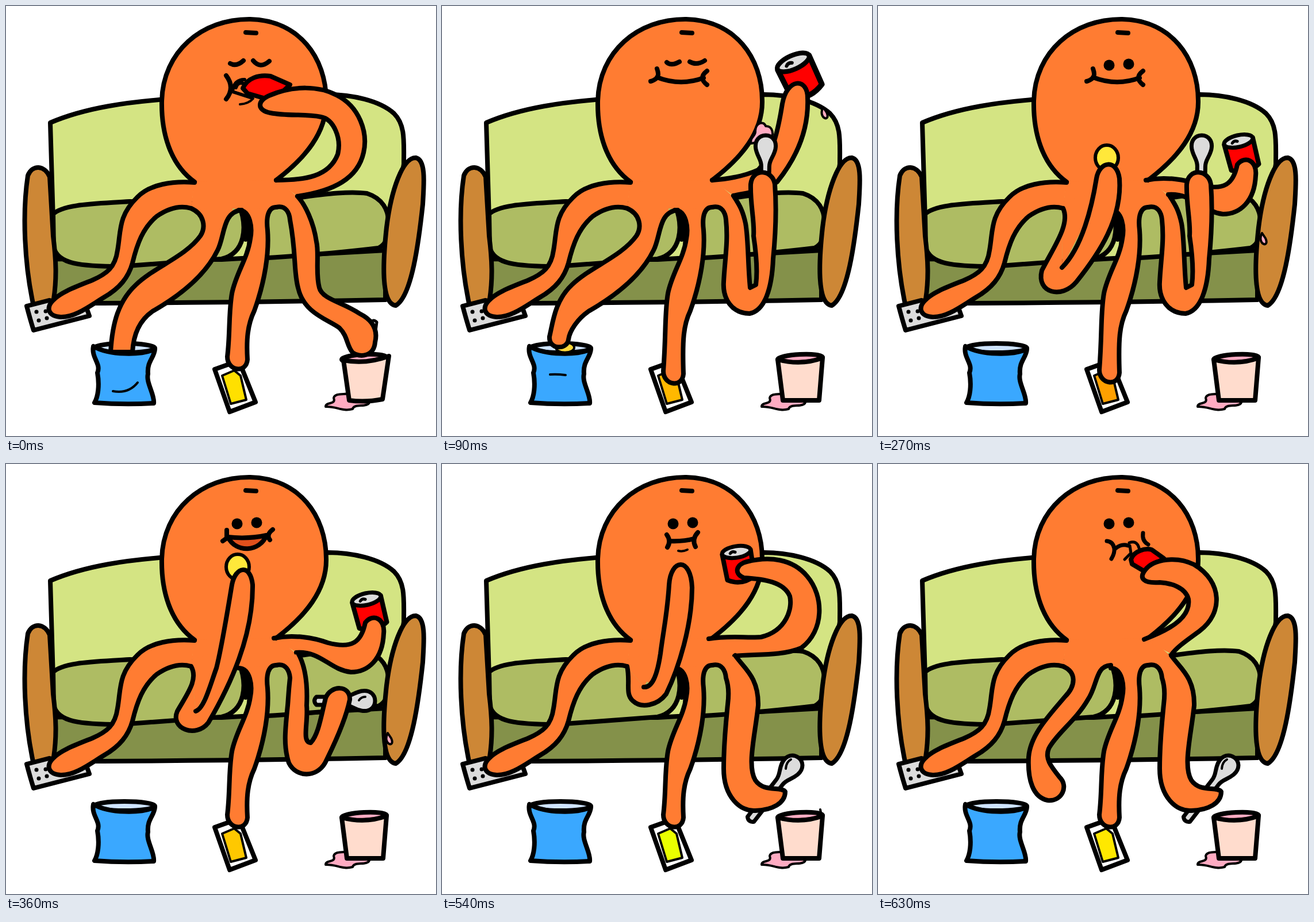
These frames come from a looping animation (748 by 748 pixels, 720 ms). An HTML page:

```html
<!DOCTYPE html>
<html lang="en">
<head>
<meta charset="utf-8">
<title>Octopus on a sofa</title>
<style>
html, body { margin: 0; height: 100%; overflow: hidden; background: #fff; }
svg { display: block; width: 100vw; height: 100vh; }
</style>
</head>
<body>
<svg id="stage" viewBox="0 0 748 748" stroke="#000" stroke-linecap="round" stroke-linejoin="round"></svg>
<script>
const SKIN = '#ff7c32', GREY = '#dcdcdc', PINK = '#ffabc2', RED = '#ff0000', CHIP = '#ffe83a';
const STEP = 90;

const path = (d, fill = 'none', w = 8) => `<path d="${d}" fill="${fill}" stroke-width="${w}"/>`;
const flat = (d, fill) => `<path d="${d}" fill="${fill}" stroke="none"/>`;
const oval = (x, y, rx, ry, fill, w = 7, turn = 0) =>
  `<ellipse cx="${x}" cy="${y}" rx="${rx}" ry="${ry}" fill="${fill}" stroke-width="${w}" transform="rotate(${turn} ${x} ${y})"/>`;
const dot = (x, y, r) => oval(x, y, r, r, '#000', 0);

// Props
const can = (x, y, turn, size = 1) => `<g transform="translate(${x} ${y}) rotate(${turn}) scale(${size})">` +
  path('M-25 1L-23 46Q0 60 25 46L25 0Z', RED) + oval(0, 0, 25, 10, GREY) + path('M-11 1Q-7 -3 -2 0', 'none', 5) + '</g>';

function spoon(x, y, endX, endY) {
  const len = Math.hypot(endX - x, endY - y);
  const turn = Math.atan2(endY - y, endX - x) * 180 / Math.PI;
  return `<g transform="translate(${x} ${y}) rotate(${turn})">` +
    path(`M6 -17C20 -14 24 -7 36 -7L${len} -7Q${len + 7} 0 ${len} 7L36 7C24 7 20 14 6 17C-26 23 -26 -23 6 -17Z`, GREY, 7) + '</g>';
}

const drop = (x, y) => path(`M${x} ${y}C${x - 10} ${y + 20} ${x + 14} ${y + 27} ${x + 6} ${y + 9}Z`, PINK, 4);

// Scenery
const sofa =
  path('M77 203C140 176 215 167 280 162L560 154C600 154 650 164 675 187C695 207 692 235 692 275L665 440L84 440Z', '#d4e483') +
  path('M85 440L375 441L462 436L660 425L660 511Q350 517 82 517Z', '#84914a') +
  path('M82 362C100 344 160 344 215 340L405 345C421 385 416 430 375 440Q290 446 200 453C130 453 90 449 83 420Z', '#aebc63') +
  path('M422 345L505 334C560 326 600 322 628 326C656 335 665 356 665 374C667 400 662 414 648 421Q560 432 424 440Z', '#aebc63') +
  path('M414 365Q421 382 417 405', 'none', 10) +
  path('M38 295C46 275 67 277 76 297L82 400C87 440 89 475 82 516L48 522C32 450 28 360 38 295Z', '#cd8736') +
  path('M713 264C731 268 727 310 725 345C718 410 706 505 678 521C651 518 656 440 662 385C670 320 690 263 713 264Z', '#cd8736') +
  path('M36 522L75 512L140 525L145 539L48 564Q42 545 36 522Z', GREY) +
  dot(53, 532, 3.5) + dot(69, 531, 3.5) + dot(57, 547, 3.5) + dot(71, 543, 3.5);

const puddle = path('M556 697C556 688 575 694 570 682C572 672 590 677 602 673L632 690C628 699 605 691 603 701C585 706 575 696 556 697Z', PINK, 4);

const bagBack = oval(206, 595, 53, 8, '#cfe4ff', 8);
const bagFront = path('M152 592C148 612 166 622 159 638C163 660 160 680 154 690Q205 694 257 691C259 676 243 655 247 640C245 618 258 612 259 597C235 608 180 608 152 592Z', '#3aa8ff');

const cupBack = oval(623, 613, 39, 7, PINK, 8, -3);
const cupFront = path('M584 615L593 686L656 686L662 612Q625 626 584 615Z', '#ffdccd');
const deepCup = path('M587 616L597 686Q625 690 655 684L666 609Q625 624 587 616Z', '#ffdccd');

const phone = color => path('M363 632L405 617L434 689L389 706Z', '#fff') +
  path('M376 643L397 634L408 643L418 685L391 692Z', color, 4);

// Body
const head = path('M328 306C285 275 270 220 271 165C273 80 340 22 425 23C510 25 557 90 557 165C558 220 520 265 470 303', SKIN) +
  path('M417 46L435 47', 'none', 8);
const torso = flat('M328 300L470 300L508 333L492 353L470 350L440 370L413 355L395 352L365 385L322 351Z', SKIN);
const restArm = path('M328 307C290 304 250 310 228 333C195 365 200 392 194 425C190 455 175 466 150 477C120 489 95 498 82 512C68 526 75 540 95 541C120 542 145 522 170 507C198 491 213 472 220 447C228 414 238 386 262 366C285 350 305 347 322 352', SKIN);
const tapArm = y => path(`M405 355C425 356 429 385 425 405C420 440 400 465 393 500C387 535 390 570 385 ${y - 22}C385 ${y + 3} 418 ${y + 8} 420 ${y - 17}C418 580 420 555 432 530C450 480 458 430 455 390C452 365 457 350 470 350`, SKIN);

// Snack arm
const ROOT = 'M322 352';
const reachBag = ROOT + 'C345 362 348 385 338 400C312 436 258 454 226 485C196 513 ';
const backFromBag = 'C222 565 236 544 255 531C297 507 345 472 368 425C381 400 376 358 410 355';
const snack = {
  inBag: reachBag + '185 550 182 602L220 602' + backFromBag,
  aboveBag: reachBag + '193 550 187 575C185 598 218 599 220 580' + backFromBag,
  grab: ROOT + 'C345 362 348 380 340 392C320 430 270 445 245 490C230 515 230 545 247 570C260 577 280 572 279 552C272 525 272 505 295 485C325 460 365 435 372 410C380 385 380 356 410 355',
  lift: ROOT + 'C335 380 305 420 285 460C275 500 320 510 345 480C385 430 425 370 420 300C415 265 385 270 380 300C372 350 355 420 320 455',
  eat: ROOT + 'C335 375 315 400 298 430C285 460 330 478 352 450C390 385 430 300 429 210C425 173 399 178 393 210C383 270 375 320 366 355C355 385 345 425 330 430',
  lick: ROOT + 'C328 380 318 400 332 412C347 426 375 420 390 400C412 355 435 280 435 215C433 161 398 164 395 210C392 260 385 290 380 330C374 370 365 389 351 388',
  down: ROOT + 'C345 362 345 385 325 405C300 435 265 470 262 510C260 550 270 580 295 585C320 588 332 560 316 545C300 525 290 512 297 495C310 470 345 445 365 410C382 385 378 351 405 350'
};
const snackRoot = end => flat(`M322 340L322 352L${end}L390 320Z`, SKIN);

// Spoon arm
const HIP = 'M470 350C487 346 493 360 494 372';
const scoop = {
  inCup: HIP + 'C505 430 500 460 508 490C518 535 560 545 580 560C595 575 592 590 603 603C615 612 640 610 642 585C648 560 635 545 615 535C585 515 550 510 545 490C538 465 545 430 540 410C535 375 520 345 507 331',
  raise: HIP + 'C498 410 492 440 490 480C488 510 505 535 535 535C562 530 574 490 576 440C580 400 582 350 579 310C575 284 540 281 537 310C536 345 544 375 542 400C548 440 548 470 546 485L536 490C532 450 533 405 528 378C522 350 514 342 507 330',
  mouth: 'M470 350C476 350 478 357 480 362C490 385 500 410 520 417C555 434 580 400 583 360C587 310 575 250 545 222C520 195 490 184 455 188C430 192 417 207 424 224C440 230 470 220 490 232C530 255 552 300 550 345C549 370 530 366 525 355C515 342 503 332 503 325',
  side: HIP + 'C491 400 491 410 490 420C486 460 482 490 492 520C505 546 540 546 555 520C575 480 592 440 598 410C599 384 565 384 556 407C548 440 543 472 530 485C514 484 526 450 523 420C525 380 520 350 508 329',
  lower: HIP + 'C492 400 493 410 492 420C486 470 482 510 495 545C515 575 555 570 575 545C595 525 605 505 600 490C590 474 570 480 562 500C550 525 535 530 530 505C528 470 540 440 535 405C532 370 520 345 508 330',
  floor: HIP + 'C500 390 498 400 498 408C495 440 490 480 490 530C490 580 520 605 545 603C575 602 597 590 597 570C590 560 560 572 545 550C530 525 545 470 550 420C551 370 525 355 510 333'
};

// Can arm
const drink = {
  sip: 'M470 303C520 303 562 297 577 258C584 230 570 197 548 193C520 187 490 192 460 186C435 181 437 164 460 155C500 138 545 139 575 155C615 175 630 220 622 255C612 300 570 322 507 331',
  high: 'M470 303C510 300 535 292 550 285C575 260 585 215 592 170C600 125 636 124 636 160C638 210 620 260 583 306C560 322 530 325 507 330',
  rest: 'M466 303C500 296 535 302 560 311C602 322 618 310 625 276C638 259 660 269 657 295C655 340 630 362 600 362C563 358 548 325 505 328',
  swing: 'M466 303C500 298 540 312 565 305C595 290 590 265 583 245C575 215 605 205 620 225C650 270 645 320 605 345C575 350 540 340 507 329',
  near: 'M464 304C500 298 530 303 555 301C600 290 610 250 605 230C595 205 560 200 525 198C506 190 513 174 530 170C570 160 610 165 635 195C665 230 665 290 625 320C590 335 540 330 509 334',
  gulp: 'M463 305C500 291 545 270 540 235C535 215 510 207 490 206C460 208 454 198 465 184C480 165 520 160 550 175C600 205 600 260 560 290C540 305 520 318 511 331'
};
const tipped = path('M412 143C420 125 440 119 460 122L494 137L465 165L420 152Z', RED);
const tippedLow = path('M440 166C445 151 465 146 476 149L497 164L464 187L442 174Z', RED);

// Faces
const eyes = (x, y) => dot(x, y, 9.5) + dot(x + 34, y - 2, 9.5);
const smile = path('M374 124Q415 140 455 125M374 109Q378 120 374 125Q368 130 363 131M461 113C449 122 452 130 461 137', 'none', 8);
const grin = path('M386 127Q420 131 453 124C442 153 400 156 386 127Z', '#e0501c', 8) +
  path('M384 115L384 129L377 134M464 114Q452 123 459 132', 'none', 8);
const chew = path('M391 123Q399 134 392 145M397 134Q420 135 438 130M445 119Q434 131 441 144', 'none', 8) +
  path('M411 151Q419 153 427 149', 'none', 4);
const sipping = path('M390 100Q401 106 413 95M430 95Q442 110 458 96M383 121Q399 142 383 162', 'none', 8) +
  path('M394 148Q397 128 415 128M400 142Q403 131 414 135M394 149L428 160', 'none', 6) + path('M407 171Q422 170 430 161', 'none', 4);
const content = path('M391 98Q399 105 413 97M431 97Q443 104 457 95', 'none', 8) + smile;
const gulping = eyes(402, 104) +
  path('M398 134Q409 135 411 147Q412 155 406 165M413 147Q424 138 435 142M461 120Q459 134 470 140', 'none', 7) +
  path('M437 137Q450 132 454 146M429 166L440 155L438 142', 'none', 5);

const cream = (x, y) => path(`M${x - 18} ${y + 22}C${x - 22} ${y + 12} ${x - 9} ${y + 9} ${x - 11} ${y}C${x - 10} ${y - 14} ${x + 4} ${y - 18} ${x + 7} ${y - 8}C${x + 20} ${y - 9} ${x + 22} ${y + 8} ${x + 15} ${y + 16}Z`, PINK, 4);

const restingCan = can(627, 235, -13, 1.02);
const floorSpoon = spoon(609, 525, 537, 618) + path('M598 530Q599 518 607 514', 'none', 4);

const poses = [
  { face: sipping, can: tipped, drink: 'sip', scoop: 'inCup', snack: 'inBag', tap: 632, screen: '#ffe000',
    spoon: path('M632 556Q637 542 645 550L643 565', '#fff', 5), cup: deepCup, bag: path('M186 670Q213 675 229 655', 'none', 4) },
  { face: content, can: can(611, 98, -24, 1.2), drink: 'high', scoop: 'raise', snack: 'aboveBag', tap: 657, screen: '#ffb800',
    spoon: cream(556, 217) + spoon(563, 243, 562, 300), chip: oval(214, 594, 16, 9, '#ffd83a', 4),
    drip: drop(663, 176), bag: path('M188 641Q200 640 215 642', 'none', 4) },
  { face: eyes(406, 102) + smile, can: restingCan, drink: 'rest', scoop: 'mouth', snack: 'grab', tap: 668, screen: '#ff8000',
    spoon: cream(411, 157) + spoon(419, 177, 470, 243), chip: oval(278, 577, 29, 18, CHIP, 6, 8), drip: drop(674, 312) },
  { face: eyes(402, 103) + smile, can: restingCan, drink: 'rest', scoop: 'raise', snack: 'lift', tap: 655, screen: '#ffa000',
    spoon: spoon(563, 243, 562, 300), chip: oval(398, 264, 20, 22, CHIP, 6), root: '320 455', drip: drop(668, 395) },
  { face: eyes(402, 104) + grin, can: restingCan, drink: 'rest', scoop: 'side', snack: 'eat', tap: 632, screen: '#ffc800',
    spoon: spoon(624, 412, 540, 412) + path('M614 411Q618 405 625 405', 'none', 4),
    chip: oval(403, 179, 20, 22, CHIP, 6), root: '330 430', drip: drop(664, 468) },
  { face: eyes(402, 104) + chew, can: can(583, 197, -12), drink: 'swing', scoop: 'lower', snack: 'eat', tap: 632, screen: '#ffe000',
    spoon: spoon(627, 468, 548, 520), root: '330 430', drip: drop(660, 548) },
  { face: eyes(402, 104) + chew, can: can(512, 153, -9), drink: 'near', scoop: 'floor', snack: 'lick', tap: 632, screen: '#eaff00',
    spoon: floorSpoon, root: '351 388', drip: path('M658 601L659 606', 'none', 4) },
  { face: gulping, can: tippedLow, drink: 'gulp', scoop: 'floor', snack: 'down', tap: 632, screen: '#ffe800',
    spoon: floorSpoon }
];

const draw = p => [
  sofa, puddle, bagBack, phone(p.screen), torso, head, p.face,
  restArm, tapArm(p.tap), p.can, path(drink[p.drink], SKIN), cupBack,
  p.spoon, path(scoop[p.scoop], SKIN), p.cup || cupFront,
  p.root ? snackRoot(p.root) : '', p.chip || '', path(snack[p.snack], SKIN),
  bagFront, p.bag || '', p.drip || ''
].join('');

const scenes = poses.map(draw);
const stage = document.getElementById('stage');
let shown = -1;
function tick() {
  const now = Math.floor(performance.now() / STEP) % scenes.length;
  if (now !== shown) stage.innerHTML = scenes[shown = now];
  requestAnimationFrame(tick);
}
tick();
</script>
</body>
</html>
```
